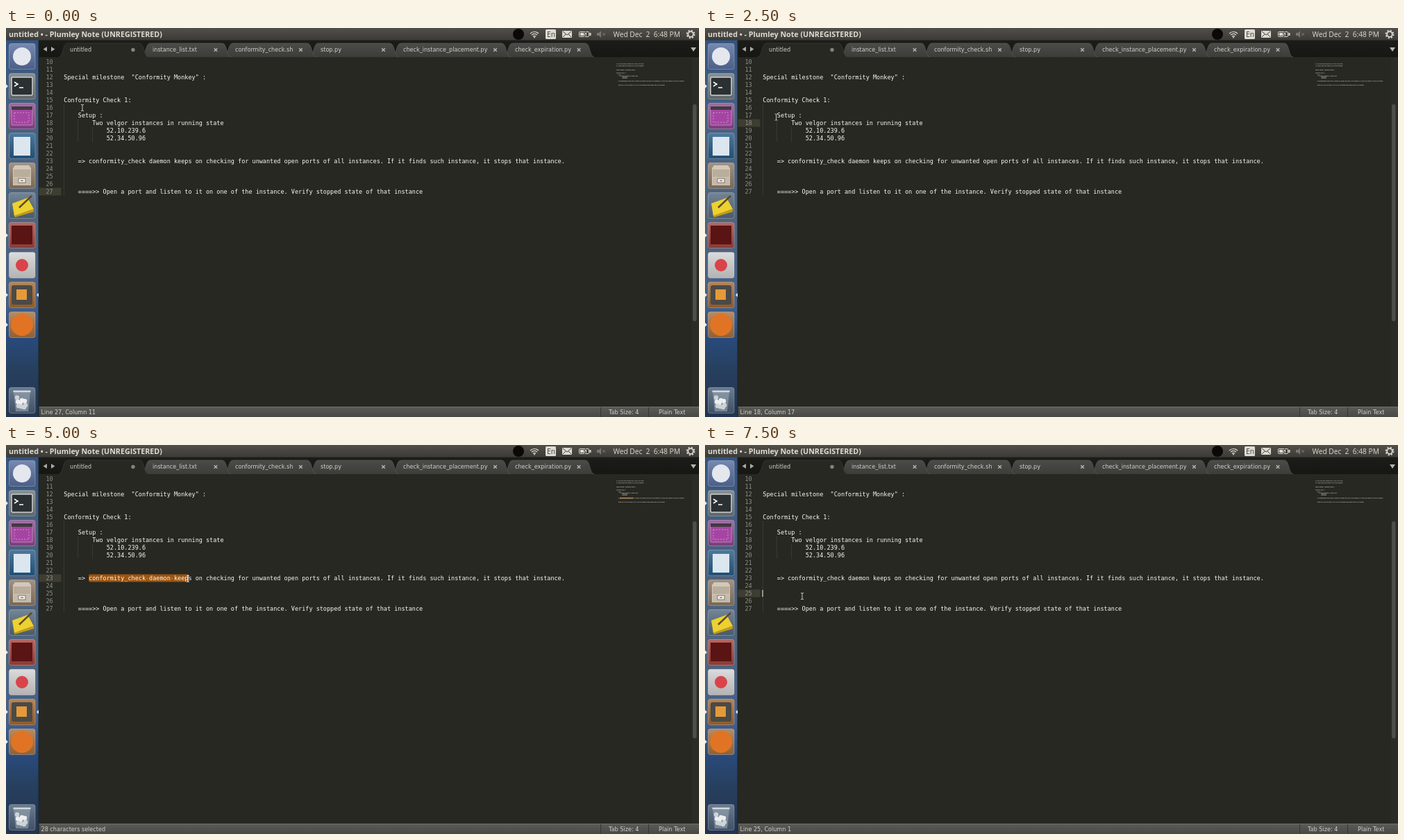
An HTML page for the animation above (8 s loop, 998 by 561 pixels).

```html
<!DOCTYPE html>
<html lang="en">
<head>
<meta charset="utf-8">
<title>Editor session</title>
<style>
html, body { margin: 0; width: 100%; height: 100%; overflow: hidden; background: #272822; }
svg { display: block; width: 998px; height: 561px; }
text { white-space: pre; }
.code { font: 8.5px "DejaVu Sans Mono", monospace; fill: #f8f8f2; }
.num { fill: #8f908a; }
.ui { font: 8.1px "DejaVu Sans", sans-serif; fill: #d0d0cc; }
.panel { font: 10.2px "Open Sans", sans-serif; fill: #dfdbd2; }
.title { font: bold 10.7px "Open Sans", sans-serif; }
</style>
</head>
<body>
<svg viewBox="0 0 998 561">
  <defs>
    <linearGradient id="panel" x2="0" y2="1"><stop stop-color="#504f49"/><stop offset="1" stop-color="#3c3b37"/></linearGradient>
    <linearGradient id="dock" x2="0" y2="1">
      <stop stop-color="#34547f"/><stop offset=".2" stop-color="#48617f"/><stop offset=".5" stop-color="#50657c"/>
      <stop offset=".7" stop-color="#45608a"/><stop offset=".79" stop-color="#294a7c"/>
      <stop offset=".87" stop-color="#27405f"/><stop offset="1" stop-color="#22344f"/>
    </linearGradient>
    <linearGradient id="bar" x2="0" y2="1"><stop stop-color="#1c1d19"/><stop offset="1" stop-color="#161713"/></linearGradient>
    <linearGradient id="tab" x2="0" y2="1"><stop stop-color="#4b4c47"/><stop offset="1" stop-color="#3c3d38"/></linearGradient>
    <linearGradient id="status" x2="0" y2="1"><stop stop-color="#5b5c57"/><stop offset="1" stop-color="#484944"/></linearGradient>
    <linearGradient id="gloss" x2="0" y2="1"><stop stop-color="#fff" stop-opacity=".18"/><stop offset="1" stop-color="#000" stop-opacity=".15"/></linearGradient>
  </defs>
  <g id="frame"></g>
  <g id="marks"></g>
  <g id="page"></g>
  <path id="cursor" d="M-2-4.5H-.8L0-4 .8-4.5H2M0-4V4M-2 4.5H-.8L0 4 .8 4.5H2" fill="none" stroke="#d8d8d4" stroke-width=".9"/>
</svg>
<script>
const CHAR = 8.5 * 0.602, LEFT = 83.3, ROW = 11;
const MAP_X = 879, MAP_CHAR = 0.69;
const lines = {
  12: 'Special milestone  "Conformity Monkey" :',
  15: 'Conformity Check 1:',
  17: '\tSetup : ',
  18: '\t\tTwo velgor instances in running state',
  19: '\t\t\t52.10.239.6',
  20: '\t\t\t52.34.50.96',
  23: '\t=> conformity_check daemon keeps on checking for unwanted open ports of all instances. If it finds such instance, it stops that instance.',
  27: '\t====>> Open a port and listen to it on one of the instance. Verify stopped state of that instance'
};
// lines scrolled out of view, seen only in the minimap
const hidden = { 6: '=> a file lists every instance that is kept in this setup', 8: '=> a daemon checks each instance for the given conditions' };

// [first step, caret line, caret index, selection start line, start index]
const phases = [
  [0, 27, 7], [2, 16, 0, 15, 0], [4, 18, 10], [6, 21, 0, 17, 1],
  [8, 21, 0], [10, 23, 32, 23, 4], [11, 24, 0, 23, 4], [15, 25, 0]
];
// pointer x, y and caret visibility for every half second
const steps = [
  [110, 115, 0], [82, 107, 1], [156, 107, 1], [166, 133, 0],
  [162, 139, 1], [102.5, 128.5, 0], [194, 169.5, 1], [194, 169, 1],
  [129.5, 193.5, 1], [119, 194, 0], [262, 193, 1], [766, 204, 1],
  [792, 200.5, 0], [262, 252.5, 1], [140, 218, 0], [140, 218, 1]
];

const $ = id => document.getElementById(id);
const rect = (x, y, w, h, fill, more = '') => `<rect x="${x}" y="${y}" width="${w}" height="${h}" fill="${fill}" ${more}/>`;
const disc = (x, y, r, fill, more = '') => `<circle cx="${x}" cy="${y}" r="${r}" fill="${fill}" ${more}/>`;
const path = (d, fill, more = '') => `<path d="${d}" fill="${fill}" ${more}/>`;
const line = (d, color, width = 1, more = '') => path(d, 'none', `stroke="${color}" stroke-width="${width}" ${more}`);
const text = (x, y, s, cls, more = '') => `<text x="${x}" y="${y}" class="${cls}" ${more}>${s}</text>`;
const expand = s => s.replace(/\t/g, '    ');
const raw = n => lines[n] || '';
const column = (n, i) => expand(raw(n).slice(0, i)).length;
const rowY = n => 49 + (n - 10) * ROW;
const mapY = n => 60 + (n - 12) * 1.46;

function topPanel() {
  const pale = '#dfdbd2';
  return rect(0, 0, 998, 17.5, 'url(#panel)')
    + text(4, 12.5, 'untitled • - Plumley Note (UNREGISTERED)', 'panel title')
    + disc(738, 9, 8, '#0c0808')
    + line('M755 8a8.5 8.5 0 0 1 12 0M757 10.2a5.5 5.5 0 0 1 8 0M759 12.2a3 3 0 0 1 4 0', pale, 1.2) + disc(761, 13.6, 1, pale)
    + rect(777, 2, 15, 14, pale, 'rx="1.5"') + text(779, 12.7, 'En', 'panel', 'style="fill:#3c3b37"')
    + rect(801, 4, 14, 10, pale, 'rx="1"') + line('M802 5l6 5 6-5M802 13l4-4M814 13l-4-4', '#45443f')
    + rect(825.5, 5.5, 14, 7, 'none', `rx="1" stroke="${pale}"`) + rect(827, 7, 9, 4, pale) + rect(840.5, 7, 2, 4, pale)
    + line('M835 5l-3 4h3l-2 4', '#45443f')
    + path('M851 7h3l3-3v10l-3-3h-3z', '#77756e') + line('M859 7l4 4m0-4l-4 4', '#77756e')
    + text(874.5, 12.5, 'Wed Dec  2  6:48 PM', 'panel')
    + disc(986, 9, 3.8, 'none', `stroke="${pale}" stroke-width="1.8"`)
    + disc(986, 9, 5.5, 'none', `stroke="${pale}" stroke-width="1.8" stroke-dasharray="2.2 2.12"`);
}

function dock() {
  const tile = (y, fill) => rect(4.5, y - 18.5, 37.5, 37, fill, 'rx="3"')
    + rect(4.5, y - 18.5, 37.5, 37, 'url(#gloss)', 'rx="3" stroke="#fff" stroke-opacity=".25"');
  const fills = ['#5a70a0', '#70797d', '#8f4a8e', '#285d88', '#8f7b66', '#566b80', '#a5453f', '#d4d4d4', '#a96a2d', '#a77342'];
  let s = rect(0, 17.5, 47, 544, 'url(#dock)') + line('M47 18V561', '#1b2533');
  fills.forEach((fill, i) => s += tile(41 + i * 43, fill));
  s += disc(23, 41, 13, '#e4e7ee')
    + rect(8, 71, 30, 26, '#2b3033', 'rx="2" stroke="#cdd0d0" stroke-width="1.5"')
    + line('M12 78l5 3-5 3M19 86h6', '#fff', 1.5)
    + rect(8, 113, 30, 27, '#a545a2', 'rx="1" stroke="#d09fd0" stroke-width=".7"') + rect(8, 113, 30, 5, '#423a43')
    + line('M12 122H33V136H12Z', '#d9a6d6', 0.8, 'stroke-dasharray="2 2"')
    + rect(11, 157, 24, 27, '#dce6ee')
    + path('M10 202l3-4h20l3 4v25H10z', '#d2c8ba') + rect(11, 204, 24, 11, '#b9ad9c') + rect(11, 216, 24, 11, '#c5baaa')
    + rect(18, 217, 10, 6, '#f4f1ec', 'stroke="#81766a"') + rect(21, 219.5, 4, 1.2, '#6b6258')
    + path('M9 253l22-8 9 16-28 10z', '#ecd12f') + path('M8 265l4 6 28-10v4l-27 8z', '#c49c18')
    + line('M19 259L37 242', '#5f4a28', 2.5)
    + rect(8, 285, 30, 27, '#5a1414')
    + disc(23, 342, 9, '#d8444a')
    + rect(8, 371, 30, 28, '#4a4a48', 'rx="3"') + rect(15, 377, 15, 15, '#e59a3a')
    + disc(23, 428, 16, '#e07424')
    + tile(537, '#4c6079')
    + path('M11 525h24l-3 28H14z', '#9aa6b3', 'fill-opacity=".6"') + line('M10.5 524h25', '#d2d8de', 2.5);
  for (let i = 0; i < 9; i++) s += disc(16 + i * 5 % 14, 533 + i * 7 % 15, 3.2, i % 2 ? '#eceeef' : '#cdd3d8');
  for (const y of [84, 299, 385, 428]) s += path(`M0 ${y - 3}l3 3-3 3z`, '#e8e8e8');
  return s + path('M47 382l-3 3 3 3z', '#e8e8e8');
}

function tabs() {
  const all = [
    ['untitled', 92, 183], ['instance_list.txt', 211, 302], ['conformity_check.sh', 330, 424.5],
    ['stop.py', 453, 543.5], ['check_instance_placement.py', 572, 704.5], ['check_expiration.py', 733, 825]
  ];
  let s = rect(47.5, 17.5, 950.5, 24.5, 'url(#bar)');
  for (const [name, x, end] of all.reverse()) {
    const active = x === 92, l = x - 16, r = end + 22;
    s += path(`M${l} 42C${l + 7} 41 ${l + 5} 22 ${l + 13} 22H${r - 13}C${r - 5} 22 ${r - 7} 41 ${r} 42`,
      active ? '#272822' : 'url(#tab)', `stroke="${active ? '#3c3d38' : '#585953'}" stroke-width=".7"`);
    s += text(x, 34, name, 'ui');
    s += active ? disc(end, 31.5, 2.7, '#83847f') : line(`M${end - 2.3} 29.2l4.6 4.6m0-4.6l-4.6 4.6`, '#b9bab5', 1.3);
  }
  return s + path('M59 27v7l-5.5-3.5z', '#aaaba6') + path('M65 27v7l5.5-3.5z', '#aaaba6') + path('M986 28h8l-4 6z', '#b4b5b0');
}

function minimap() {
  let s = '';
  for (const [n, str] of Object.entries({ ...hidden, ...lines }))
    for (const word of expand(str).matchAll(/\S+/g))
      s += rect(MAP_X + word.index * MAP_CHAR, mapY(n), word[0].length * MAP_CHAR, 1.1, '#a7a8a1', 'opacity=".6"');
  return s;
}

function buildFrame() {
  const bars = rect(47.5, 546, 950.5, 15, 'url(#status)') + line('M47 546.5H998', '#6d6e69')
    + line('M856.5 547V561M925.5 547V561', '#353631')
    + text(868, 557, 'Tab Size: 4', 'ui') + text(940, 557, 'Plain Text', 'ui')
    + rect(987.5, 42, 10.5, 504, '#2b2c27') + rect(989, 110, 5.5, 313, '#4d4e49', 'rx="2.7"');
  $('frame').innerHTML = rect(47.5, 42, 950.5, 504, '#272822') + tabs() + bars + topPanel() + dock();
}

function buildPage() {
  let s = minimap();
  for (let n = 10; n <= 27; n++) s += text(57.5, rowY(n) + 3.2, n, 'code num');
  for (const n in lines) s += text(LEFT, rowY(n) + 3.2, expand(lines[n]), 'code');
  $('page').innerHTML = s;
}

function guides() {
  return [[0, 16, 27], [4, 18, 20], [8, 19, 20]].map(([col, from, to]) => {
    const x = Math.floor(LEFT + col * CHAR) + 0.5;
    return line(`M${x} ${rowY(from) - 5}V${rowY(to) + 5}`, '#484942', 1, 'stroke-dasharray="1 1"');
  }).join('');
}

function selection(n, from, to, wholeLine) {
  const a = column(n, from), b = column(n, to) + wholeLine;
  let s = rect(LEFT + a * CHAR, rowY(n) - 5.5, (b - a) * CHAR, ROW, '#9d550f', 'rx="2"')
    + rect(MAP_X + a * MAP_CHAR, mapY(n) - 0.3, (b - a) * MAP_CHAR, 1.6, '#c27622');
  for (let i = from; i < to; i++) {
    const x = LEFT + column(n, i) * CHAR, y = rowY(n) + 0.5, c = raw(n)[i];
    if (c === ' ') s += disc(x + CHAR / 2, y, 0.7, '#d0a573');
    if (c === '\t') s += line(`M${x + 0.7} ${y}H${x + 4 * CHAR - 0.7}`, '#b97c40', 0.8);
  }
  return s;
}

function draw(step) {
  const [mx, my, caretOn] = steps[step];
  const [, row, index, startRow, startIndex] = phases.filter(p => p[0] <= step).pop();
  const col = column(row, index);
  let s = rect(47.5, rowY(row) - 5.5, 32, ROW, '#3e3d32') + guides();
  let status = `Line ${row}, Column ${col + 1}`;
  if (startRow) {
    let count = 0;
    for (let n = startRow; n <= row; n++) {
      const from = n === startRow ? startIndex : 0, last = n === row;
      const to = last ? index : raw(n).length;
      count += to - from + !last;
      if (to > from || !last) s += selection(n, from, to, !last);
    }
    const span = row - startRow + 1;
    status = `${span > 1 ? span + ' lines, ' : ''}${count} characters selected`;
  }
  if (caretOn) s += rect(LEFT + col * CHAR - 0.8, rowY(row) - 5, 1, 10, '#f8f8f0');
  if (step === 2) for (const n of [15, 17, 18]) s += path(`M70 ${rowY(n) - 2.5}h7l-3.5 6z`, '#a0a19b');
  $('marks').innerHTML = s + text(50.5, 556.8, status, 'ui');
  $('cursor').setAttribute('transform', `translate(${mx} ${my})`);
}

let shown = -1;
function tick() {
  const step = Math.floor(performance.now() % 8000 / 500);
  if (step !== shown) draw(shown = step);
  requestAnimationFrame(tick);
}
buildFrame();
buildPage();
tick();
</script>
</body>
</html>
```
